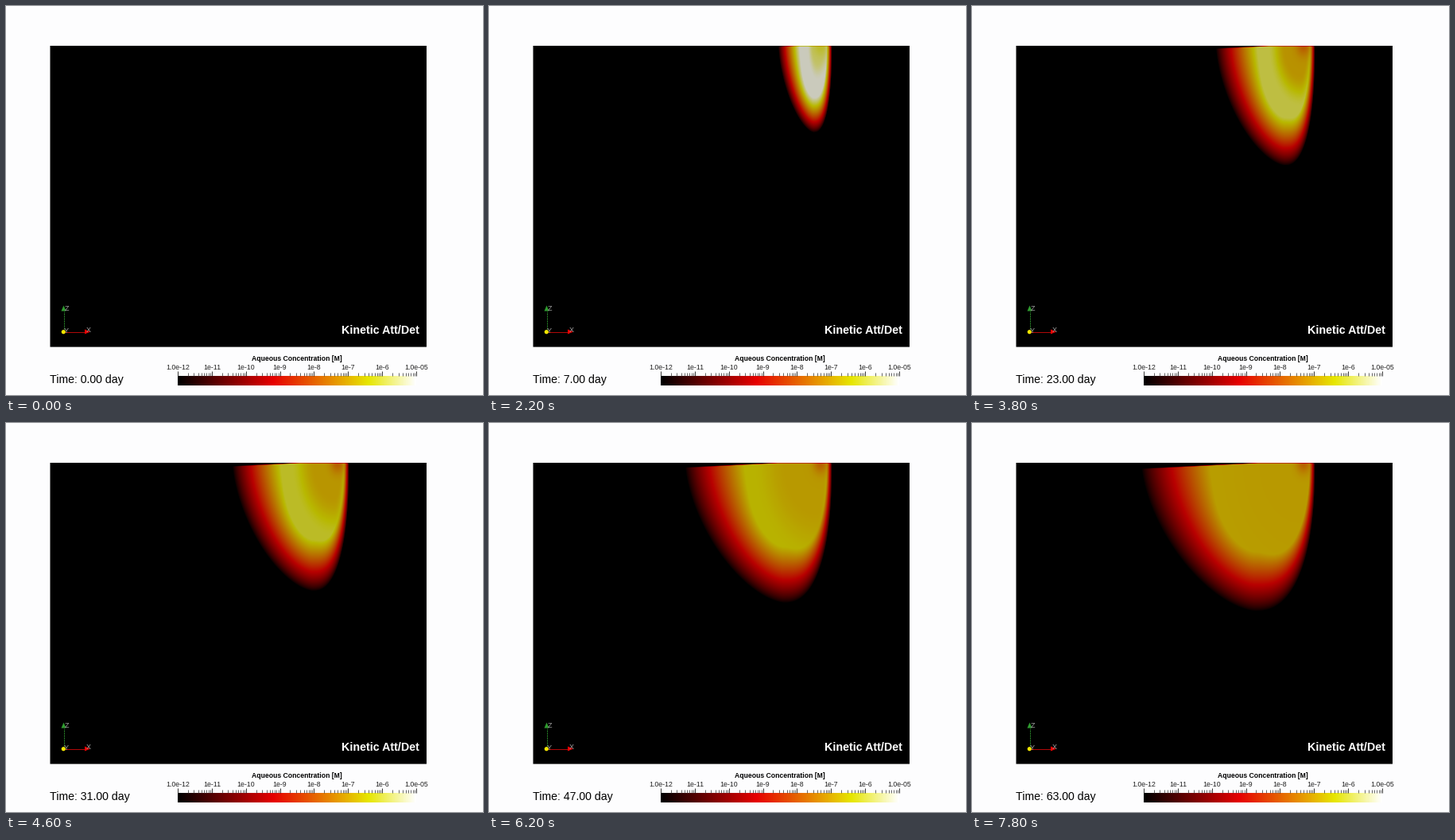
Animation of 600 by 489 pixels, one loop 8000 ms. Source, as a matplotlib script:

```python
import numpy as np
import matplotlib.pyplot as plt
from matplotlib.animation import FuncAnimation
from matplotlib.colors import LinearSegmentedColormap
from matplotlib.patches import Circle, Polygon, Rectangle

W, H, DPI = 600, 489, 64
FRAMES, INTERVAL = 40, 200
BOX = (55.5, 50, 473.5, 378.6)    # x, y, width, height of the domain
BAR = (216, 465, 300, 12)         # colour bar
RIGHT = 431.5                     # steep right side of the plume
SHADE = 0.8                       # surface lighting

HOT = LinearSegmentedColormap.from_list("hot_body", [
    (0, (0, 0, 0)), (0.4, (0.902, 0, 0)),
    (0.8, (0.902, 0.902, 0)), (1, (1, 1, 1))], N=512)

X0, X1, Y0, Y1 = 190, 440, 50, 250
gx, gy = np.meshgrid(np.arange(X0, X1) + 0.5, np.arange(Y0, Y1) + 0.5)


def smooth(x):
    x = np.clip(x, 0, 1)
    return x * x * (3 - 2 * x)


def day_at(i):
    """Half-day steps up to day 5, then two days per step."""
    return 0.5 * i if i <= 10 else 5 + 2 * (i - 10)


def plume(day):
    if day == 0:
        return np.zeros(gx.shape + (3,))
    tip = 415 - 0.93 * day
    left = RIGHT - 5 - 22 * np.sqrt(day) - 0.62 * day
    depth = 36 * np.log(1 + 2.8 * day)
    peak = 0.93 - 0.003 * day + 0.3 * np.exp(-day / 5)

    # Outline: two super-ellipse quarters meeting at the tip
    is_left = gx < tip
    power = np.where(is_left, 1.6, 2.4)
    u = np.abs(gx - tip) / np.where(is_left, tip - left, RIGHT - tip)
    v = (gy - Y0) / depth
    inside = np.clip(1 - (u ** power + v ** power) ** (1 / power), 0, 1)

    # Soft rim, its width blended from the bottom to either side
    side = u ** 2 / (u ** 2 + v ** 2 + 1e-9)
    rim = 0.4 + (np.where(is_left, 0.6, 7 / (RIGHT - tip)) - 0.4) * side
    level = peak * np.minimum(inside / rim, 1) ** 0.75

    # Clean water flushes the core once the injection ends
    ramp = smooth((day - 5) / 6)
    core = 0.735 - 0.12 * np.exp(-day / 12)
    reach = 1.35 * day
    dx = gx - 413
    r = np.hypot(dx / np.where(dx < 0, reach, 13), (gy - Y0) / (1.2 * reach + 22))
    level += (np.minimum(level, core) - level) * ramp * smooth((1.3 - r) / 0.7)
    spot = np.exp(-((gx - 417) / 9) ** 2 - ((gy - Y0) / 13) ** 2)
    level += (np.minimum(level, 0.55) - level) * 0.7 * ramp * spot

    # Sloping water table at the top left
    edge = 355 + 40 * np.exp(-day / 30)
    table = Y0 + np.maximum(edge - gx, 0) * 0.05
    below = np.clip((gy - table + 0.5) / 1.4, 0, 1)
    level *= 1 - smooth((day - 4) / 6) * (1 - below)

    return SHADE * HOT(np.clip(level, 0, 1))[..., :3]


fig = plt.figure(figsize=(W / DPI, H / DPI), dpi=DPI, facecolor="#fdfdfe")
ax = fig.add_axes([0, 0, 1, 1])
ax.axis("off")


def px(n):
    return n * 72 / DPI


def label(x, y, s, size, color="black", **kw):
    return ax.text(x, y, s, fontsize=px(size), color=color,
                   family="Liberation Sans", va="baseline", zorder=5, **kw)


def line(xs, ys, color, width, **kw):
    ax.plot(xs, ys, color=color, lw=px(width), zorder=4,
            solid_capstyle="butt", **kw)


ax.add_patch(Rectangle(BOX[:2], BOX[2], BOX[3], fc="black", ec="none",
                       snap=False, zorder=1))
field = ax.imshow(plume(0), extent=(X0, X1, Y1, Y0), interpolation="nearest",
                  aspect="auto", zorder=2)

# Orientation axes
line([72, 100], [409.5, 409.5], "#b00808", 1)
line([72.5, 72.5], [409, 384], "#2a8a2a", 1, dashes=(2, 1))
ax.add_patch(Polygon([(99, 406.5), (99, 412.5), (106, 409.5)], fc="#e60000", zorder=4))
ax.add_patch(Polygon([(69.5, 383.5), (75.5, 383.5), (72.5, 376.5)], fc="#2f9c2f", zorder=4))
ax.add_patch(Circle((72.3, 409.7), 2.6, fc="#f2e600", ec="none", zorder=5))
for name, x, y in (("X", 104, 410), ("Y", 76, 411), ("Z", 76.5, 383)):
    label(x, y, name, 9, "#a0a0a0", ha="center")

label(520, 412, "Kinetic Att/Det", 14.2, "white", weight="bold", ha="right")
clock = label(55, 474, "", 14.1)

# Colour bar with log ticks
bx, by, bw, bh = BAR
ax.imshow(HOT(np.linspace(0, 1, bw))[None, :, :3], extent=(bx, bx + bw, by + bh, by),
          interpolation="nearest", aspect="auto", zorder=3)
label(365.5, 446.5, "Aqueous Concentration [M]", 8.6, weight="bold", ha="center")
step = bw / 7
for k in range(8):
    x = bx + k * step
    line([x, x], [459, by], "#222222", 0.9)
    mark = f"1.0e-{12 - k:02d}" if k in (0, 7) else f"1e-{12 - k}"
    label(x, 457, mark, 8.8, "#222222", ha="center")
    if k < 7:
        for n in range(2, 10):
            xm = x + step * np.log10(n)
            line([xm, xm], [460.5, by], "#444444", 0.8)

ax.set_xlim(0, W)
ax.set_ylim(H, 0)


def update(i):
    day = day_at(i)
    field.set_data(plume(day))
    clock.set_text(f"Time: {day:.2f} day")
    return field, clock


anim = FuncAnimation(fig, update, frames=FRAMES, interval=INTERVAL,
                     repeat=True, repeat_delay=0)
plt.show()
```
